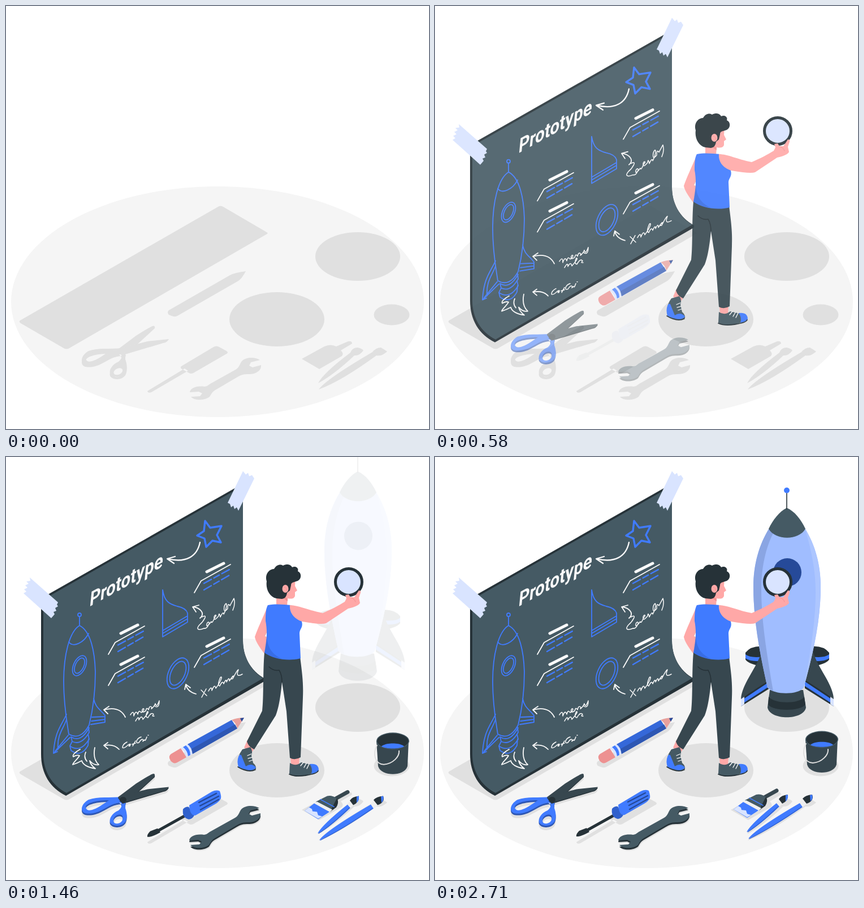
Animation, 748 px wide and 748 px high, one loop 2.75 s. Source, as an HTML page:

```html
<!DOCTYPE html>
<html lang="en">
<head>
<meta charset="utf-8">
<title>Prototype</title>
<style>
html, body { margin: 0; height: 100%; overflow: hidden; background: #fff; }
svg { display: block; width: 100%; height: 100%; }
</style>
</head>
<body>
<svg id="stage" viewBox="0 0 748 748"></svg>
<script>
const LOOP = 2750, DROP = 45;
const BLUE = '#407bff', NAVY = '#3060cc', PALE = '#d9e4ff', SKIN = '#ffa8a7',
      INK = '#263238', DARK = '#37474f', SLATE = '#455a64', SHADE = '#e0e0e0', CHALK = '#fafafa';

const fill = (color, d, extra = '') => `<path fill="${color}" fill-rule="evenodd" d="${d}" ${extra}/>`;
const line = (color, width, d, extra = '') =>
  `<path fill="none" stroke="${color}" stroke-width="${width}" stroke-linecap="round" stroke-linejoin="round" d="${d}" ${extra}/>`;
const oval = (color, x, y, rx, ry, extra = '') =>
  `<ellipse fill="${color}" cx="${x}" cy="${y}" rx="${rx}" ry="${ry}" ${extra}/>`;
const ring = (x, y, rx, ry) =>
  oval('none', x, y, rx, ry, `stroke="${BLUE}" stroke-width="1.8" transform="rotate(25 ${x} ${y})"`);
const move = (x, y, body) => `<g transform="translate(${x} ${y})">${body}</g>`;
const mirror = (axis, body) => body + `<g transform="translate(${2 * axis} 0) scale(-1 1)">${body}</g>`;

const wrenchShape = 'M324 678C325 671 335 666 350 668C355 668 358 664 362 662L405 638C412 634 412 628 416 623C424 615 440 616 448 621L432 625 429 631 435 634 450 630C451 640 440 647 426 646C416 646 412 649 405 653L371 673C362 678 362 682 359 686C350 693 332 693 326 686L342 685 346 680 340 677Z';
const blades = 'M198 603L230 579Q250 566 259 562Q264 560 263 566L214 611 206 613Z';
const lowerBlade = 'M204 601L250 589 288 585Q285 591 278 592L214 611Z';
const grips = 'M206 611C190 611 182 618 170 624C158 631 144 632 138 629C130 624 135 612 146 606C162 600 185 603 204 601Z' +
  'M141 620C140 613 156 607 182 607C174 612 164 620 155 623C148 626 142 625 141 620Z' +
  'M200 608C207 614 205 620 199 625C187 630 182 640 184 646C188 654 205 654 211 645C215 638 214 629 211 621Q210 615 212 609Z' +
  'M190 642C190 634 203 629 206 635C208 642 204 647 198 648C192 649 190 646 190 642Z';
const brushHandles = 'M551 663Q560 647 604 612L609 618Q570 655 551 663ZM554 675Q566 658 645 612L650 619Q590 660 554 675Z';

function floor() {
  const cut = fill(SHADE, blades) + fill(SHADE, lowerBlade) + fill(SHADE, grips);
  return oval('#f5f5f5', 374, 523, 365, 204) + fill(SHADE,
    'M25 556L375 355Q379 352 384 355L461 400Q465 402 460 404L112 605Q107 608 102 605L26 561Q22 558 25 556Z' +
    'M288 538L396 476Q403 472 424 469Q417 482 411 486L303 548Q298 551 288 546Q284 541 288 538Z' +
    'M310 637L367 603Q372 600 377 603L390 610Q394 613 390 615L333 648Q327 652 322 648L311 642Q307 639 310 637Z' +
    'M250 681L316 641 322 645 257 683Q251 685 250 681Z' +
    'M523 624L563 602Q574 597 584 602L605 593Q612 592 612 597L592 609Q598 614 594 619L554 642Z') + fill(SHADE,
    'M552 667Q561 649 609 613Q612 604 622 604Q630 606 632 609Q625 619 616 618Q580 652 552 667Z') + fill(SHADE,
    'M553 678Q566 660 648 612Q654 604 663 604Q670 608 674 611Q664 620 655 618Q592 664 553 678Z') +
    oval(SHADE, 622, 443, 75, 43) + oval(SHADE, 479, 554, 84, 48) + oval(SHADE, 682, 546, 31.5, 18.5) +
    move(0, 4, cut) + move(0, 8, fill(SHADE, grips)) + move(1, 5, fill(SHADE, wrenchShape));
}

const note = (x, y) => move(x, y,
  line(CHALK, 1.8, 'M181 349L193 328 245 299') + line(CHALK, 5, 'M203 312L233 297') +
  line(BLUE, 2.4, 'M198 332.500L243 308M198 344L243 318', 'stroke-dasharray="15 5 11 5"'));

function poster() {
  const sketch = line(BLUE, 1.8,
    'M130 282V298C112 309 102 350 102 397C102 440 108 470 111 490Q132 502 147 474C153 450 158 420 158 380C157 345 150 308 130 298' +
    'M111 327C119 338 138 328 146 312M107 455C98 475 86 485 84 524L113 496M84 524L91 521M87 520L110 492M92 517C90 490 102 480 107 464' +
    'M155 427C158 444 168 447 175 457V469L150 473M175 459L152 460M175 464L151 467' +
    'M115 495Q132 506 147 479M115 495L117 503Q133 511 147 487L146 478M117 503L113 511Q132 524 147 499L145 490M113 511L115 519Q133 532 145 510L146 499') +
    `<circle cx="130" cy="279" r="3" fill="none" stroke="${BLUE}" stroke-width="1.8"/>` +
    ring(130, 369, 10.5, 19) + ring(130, 369, 7.5, 14.5) + ring(304, 382.5, 16.5, 29) + ring(304, 382.5, 12, 22.5) +
    line(BLUE, 1.8, 'M277 235C280 255 288 260 303 264Q318 267 321 276V292L277 318ZM277 307L321 281M277 312L321 286');
  const chalk = line(CHALK, 1.8,
    'M131 517C122 522 117 527 119 530Q125 526 130 528C126 535 118 541 118 544Q127 541 134 537C136 545 146 549 158 551Q149 544 148 537C153 543 159 545 164 544Q153 534 157 514M141 522Q137 531 143 538' +
    'M211 460Q201 440 174 447M182 441L173 447 180 454M200 517Q191 507 174 510M180 505L173 510 180 516' +
    'M343 285C353 276 343 267 331 265M341 262L330 265 336 274M336 419Q321 415 318 403M316 411L318 402 326 408') +
    line(CHALK, 1.5,
    'M220 456Q226 446 226 458Q230 446 233 455Q235 446 239 452C247 447 243 442 241 447Q239 454 247 449Q249 441 252 447Q254 438 258 443C254 450 263 440 264 436Q266 445 271 431Q271 446 262 440' +
    'M229 467Q235 456 235 465Q240 455 242 464C248 457 254 450 250 450Q245 460 251 461Q257 450 261 455Q257 459 262 458' +
    'M214 504Q206 508 206 514Q209 516 216 509Q222 505 219 511Q215 512 220 508M223 508L229 506M224 511L229 502M239 495C230 498 228 508 235 505Q241 496 243 501Q240 505 245 500Q246 504 249 495M251 492L252 492' +
    'M346 283C359 276 349 291 342 297C335 305 341 307 350 303Q355 304 358 297C362 291 356 290 355 296Q354 303 363 291Q364 296 369 284C375 278 368 278 368 284Q368 291 376 281Q377 273 379 283Q384 272 385 278C393 262 390 253 386 264Q384 278 392 268Q392 257 396 263Q403 250 403 250Q406 260 401 271' +
    'M345 412L355 422M354 410L346 425M358 414Q364 403 364 413Q369 400 371 409C382 394 383 386 379 390Q373 404 378 405Q383 394 385 401Q390 390 390 398Q395 387 395 396Q403 384 402 388Q394 394 401 392Q409 376 411 376Q405 391 418 384');
  return fill(INK, 'M62 250L419 47V325C419 352 432 378 458 392V396L106 599C78 585 62 560 62 525Z') +
    fill(SLATE, 'M66 252L419 51V325C419 352 432 378 455 391L107 594C80 580 66 555 66 525Z') +
    fill(PALE, 'M42 213L92 257 90 261 92 264 87 267 89 272 84 274 86 278 80 285 31 241 36 238 32 234 38 231 34 227 40 224 36 220 43 219Z') +
    fill(PALE, 'M419 25L424 31 428 28 430 34 435 32 439 38 411 95 408 89 404 92 402 86 398 89 396 83 392 81Z') +
    `<text transform="matrix(.81 -.445 -.1 1 147 265)" font-family="Roboto, sans-serif" font-weight="700" font-size="36.500" fill="${CHALK}">Prototype</text>` +
    line(CHALK, 2.3, 'M343 151C338 176 318 188 286 180M299 176L285 180 297 188') +
    line(BLUE, 3.4, 'M352 113L361 125 381 122 373 138 380 151 365 148 354 159 351 144 338 139 350 131Z') +
    note(0, 0) + note(0, 55) + note(152, -109) + note(152, 23) + sketch + chalk;
}

function pencil() {
  return fill('#ed9191', 'M292 525L309 515 319 531 303 540Q297 544 291 537Q286 529 292 525Z') +
    fill(PALE, 'M309 515L322 508Q330 515 330 525L319 531Q317 520 309 515Z') +
    fill(BLUE, 'M313 513L318 510Q326 517 326 527L322 529Q321 519 313 513Z') +
    fill('#3568d9', 'M321 508L399 465 409 480 330 525Q329 514 321 508Z') +
    fill('#2e57b3', 'M328 516L405 473 409 480 330 525Z') +
    fill('#e8a09c', 'M399 465Q408 461 421 461L409 480Q407 470 399 465Z') + fill('#264a99', 'M414 462L421 461 417 468Z');
}

function scissors() {
  return move(0, 3, fill('#2d56b3', grips)) + fill(BLUE, grips) +
    fill(INK, blades) + fill(INK, lowerBlade) +
    move(0, -1.5, fill(DARK, blades) + fill(DARK, lowerBlade)) + oval(INK, 207, 606, 6, 5);
}

function wrench() {
  return move(0, 3, fill(INK, wrenchShape)) + fill(SLATE, wrenchShape);
}

function screwdriver() {
  return line(INK, 5, 'M321 631L269 660') + fill(INK, 'M268 656L255 661Q249 667 250 671 257 672 273 663Z') +
    fill(NAVY, 'M313 622Q318 617 323 618L333 633Q329 640 323 640Q311 637 313 622Z') +
    fill(BLUE, 'M324 615L364 591Q372 587 378 590Q381 599 380 603Q377 609 370 613L335 633Q325 634 324 615Z') +
    line('#264a99', 2.5, 'M341 610L372 594M343 616L376 599M344 623L376 605');
}

function bucket() {
  return fill(DARK, 'M655 499L658 544C661 554 673 558 684 558S707 554 710 544L712 499Z') +
    oval(SLATE, 684, 499.5, 29, 15) + oval(INK, 684, 499.5, 27.5, 13.5) +
    fill(BLUE, 'M664 509C671 502 697 502 704 509C696 514 672 514 664 509Z') +
    line(SHADE, 2, 'M656 507C648 522 652 540 668 541C684 540 696 527 695 517');
}

function brushes() {
  return line(DARK, 7, 'M584 601L604 590') + fill(INK, 'M548 608L568 598Q576 595 586 602Q589 609 584 617L573 625Z') +
    fill(SLATE, 'M548 607L568 597Q576 595 585 601L575 621Z') + line(BLUE, 1.6, 'M556 603L580 616') +
    fill('#f0f0f0', 'M544 610L550 607 577 621 571 627Z') +
    fill(BLUE, 'M528 623L545 610 572 625 552 638Z') + fill(PALE, 'M528 623L536 617 541 620 542 624 550 625 552 631 559 633 552 637Z') +
    fill(BLUE, brushHandles) + line(NAVY, 1.2, 'M553 663Q574 650 607 618M556 675Q595 656 648 619') +
    fill('#eee', 'M603 611L609 605 615 613 609 618ZM645 611L651 603 658 613 650 619Z') +
    fill(INK, 'M608 605Q612 598 624 597Q625 608 614 613ZM650 604Q655 598 667 597Q671 608 657 613Z') +
    fill(BLUE, 'M620 598L624 597Q625 605 620 609ZM663 598L667 597Q669 604 664 609Z');
}

function rocket() {
  const backFin = fill(INK, 'M549 346Q562 330 592 337V362L572 369Q553 365 549 358Z') +
    fill(BLUE, 'M549 349Q558 356 580 353V360Q560 363 549 356Z');
  const frontFin = fill(INK, 'M541 427L592 392V409L541 441Z') +
    fill(DARK, 'M580 333C576 356 566 370 556 388Q542 412 541 427L592 394V345Z') +
    fill(BLUE, 'M541 431L592 397V405L541 438Z') + fill(PALE, 'M541 428L547 424V437L541 441Z');
  return mirror(623, backFin) +
    fill(DARK, 'M592 412L588 443C592 466 652 466 656 443L651 412Z') +
    fill(INK, 'M590 424C600 437 645 437 653 424L655 438C645 450 599 450 589 438Z') +
    mirror(623, frontFin) +
    fill('#a0bdff', 'M591 126C573 155 563 190 563 230C563 290 575 350 588 408C600 421 642 421 652 408C668 350 682 290 682 230C682 190 672 155 654 126C640 110 604 110 591 126Z') +
    fill('#8aa5e3', 'M591 126C573 155 563 190 563 230C563 290 575 350 588 408L598 414C587 350 577 290 577 235C577 195 585 160 598 135Z') +
    fill('#adc6ff', 'M654 126C666 165 674 205 673 245C672 300 663 350 652 408C668 350 682 290 682 230C682 190 672 155 654 126Z') +
    fill(SLATE, 'M622 90C609 96 597 112 590 127C602 148 643 148 655 127C647 110 636 96 622 90Z') +
    line(INK, 1.6, 'M622 64V92') + oval(BLUE, 622, 59, 5, 5) + oval('#264a99', 623, 204, 25, 25);
}

function person() {
  const shoes =
    fill(SKIN, 'M427 500L440 515 434 523 421 514ZM503 530L519 531 518 546 504 546Z') +
    fill(SLATE, 'M418 517L432 513Q437 519 434 528L437 541Q443 546 442 552Q430 560 411 547Q408 530 418 517Z') +
    fill(BLUE, 'M411 530Q413 525 416 527L424 547Q434 540 442 549Q436 559 411 548Q408 538 411 530Z') +
    line(INK, 1.6, 'M410 548Q428 559 441 553') + line(CHALK, 1.3, 'M427 528L434 525M428 533L435 531M430 538L436 536') +
    fill(SLATE, 'M502 541Q512 548 522 540L535 543Q553 542 552 553Q549 560 523 564Q506 565 501 560Z') +
    fill(BLUE, 'M537 543Q553 541 553 554Q549 559 540 560Q543 551 537 543Z') +
    line(INK, 1.8, 'M501 561Q512 566 530 563Q550 560 552 555') + line(CHALK, 1.4, 'M521 546L526 540M527 549L531 542M532 551L536 543');
  const legs =
    fill(DARK, 'M457 345C475 352 500 357 520 353C524 385 526 400 525 425L521 531Q511 537 502 532L496 450 488 398C485 430 481 447 477 457L439 517Q429 513 426 503L453 449C456 425 454 380 457 345Z') +
    line(INK, 1.6, 'M465 371Q473 379 483 377Q488 385 488 398');
  const head =
    fill(SKIN, 'M478 240L498 222 512 213 511 228 515 236 511 239 511 246Q509 252 498 250L497 264Q487 267 478 262Z') +
    fill('#f28f8f', 'M498 250Q492 249 489 244Q491 252 498 255Z') +
    fill(INK, 'M478 250C465 247 459 232 461 220C457 208 465 198 474 198C478 190 486 189 490 192C498 188 504 191 506 195C513 192 518 197 516 202C523 205 523 215 516 219C508 222 504 221 504 227L502 236 497 240Q496 250 488 251Z') +
    oval(SKIN, 494, 233, 5.5, 7) + line('#f28f8f', 1, 'M492 230Q496 230 496 236');
  return fill(SKIN, 'M463 263C454 285 445 303 440 318Q441 327 457 348L460 332 462 318 458 317 466 300Z') +
    shoes + legs + head +
    fill(BLUE, 'M463 262C478 259 492 261 504 262C512 272 520 281 523 291C526 302 519 304 519 312L521 356C500 362 472 357 457 346C462 325 462 305 459 290C459 275 460 267 463 262Z') +
    fill(NAVY, 'M461 318C463 340 473 350 488 357Q469 354 457 346Z', 'opacity=".5"') +
    `<circle cx="606" cy="221" r="23.500" fill="${PALE}" stroke="${INK}" stroke-width="5"/>` +
    fill(SKIN, 'M502 262C518 262 534 271 560 276C574 270 588 263 599 256L602 250 600 244 606 243 609 248 616 248 624 236Q628 236 627 240L624 249 626 258Q623 264 605 268L566 294Q558 297 524 291C508 286 501 274 502 262Z') +
    line('#f28f8f', 1, 'M609 248Q616 250 618 256');
}

const actors = [
  { draw: poster, delay: 0 },
  { draw: pencil, delay: 100 },
  { draw: scissors, delay: 200 },
  { draw: wrench, delay: 300 },
  { draw: screwdriver, delay: 500 },
  { draw: bucket, delay: 600 },
  { draw: brushes, delay: 700 },
  { draw: rocket, delay: 1000, length: 1700, drop: 2 * DROP, fade: 2 },
  { draw: person, delay: 0, drop: 0 },
];

// Cubic-bezier(.36, -.01, .5, 1.38): settles with a slight overshoot.
function ease(x) {
  if (x <= 0) return 0;
  if (x >= 1) return 1;
  const curve = (s, a, b) => 3 * s * (1 - s) * ((1 - s) * a + s * b) + s ** 3;
  let low = 0, high = 1;
  for (let i = 0; i < 24; i++) {
    const mid = (low + high) / 2;
    if (curve(mid, .36, .5) < x) low = mid; else high = mid;
  }
  return curve(low, -.01, 1.38);
}

const stage = document.getElementById('stage');
stage.innerHTML = floor() + actors.map(a => `<g opacity="0">${a.draw()}</g>`).join('');
const groups = [...stage.children].slice(-actors.length);

function render() {
  const time = performance.now() % LOOP + 15;
  actors.forEach(({ delay, length = 1000, drop = DROP, fade = 1 }, i) => {
    const p = ease((time - delay) / length);
    groups[i].setAttribute('opacity', Math.min(1, Math.max(0, p) ** fade));
    groups[i].setAttribute('transform', `translate(0 ${(p - 1) * drop})`);
  });
  requestAnimationFrame(render);
}
render();
</script>
</body>
</html>
```
